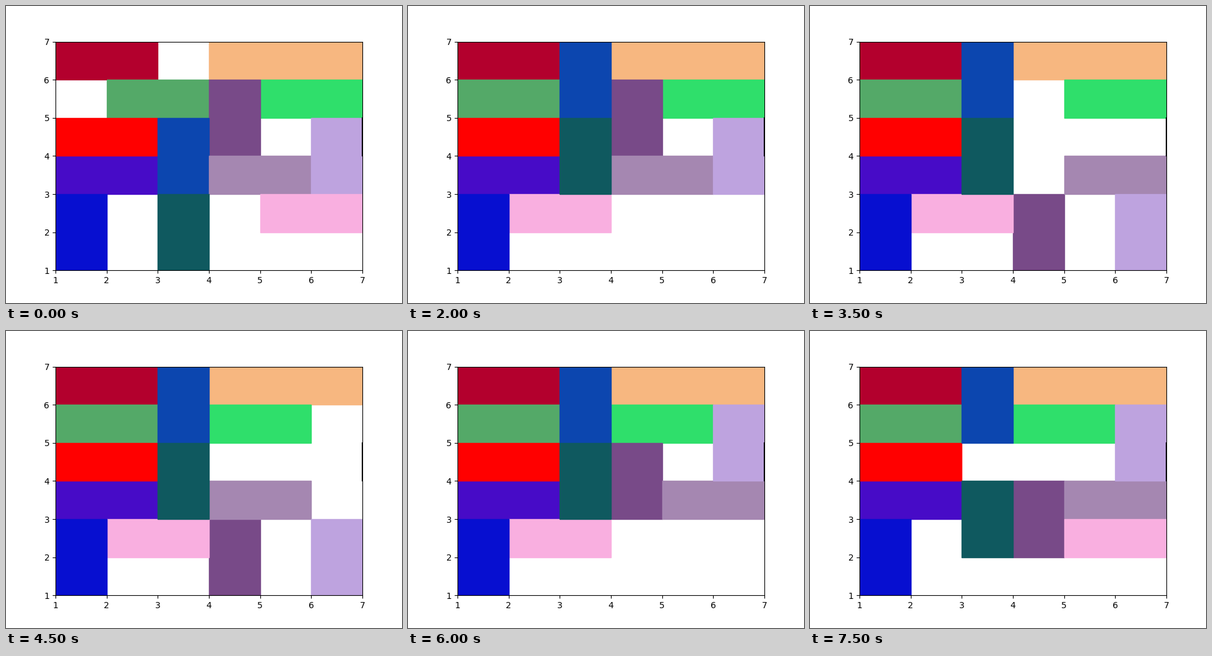
Recreate the animation shown at these times as a matplotlib script. Size 640x480 px, loop 8 s.

```python
import matplotlib.pyplot as plt
from matplotlib.animation import FuncAnimation
from matplotlib.patches import Rectangle

STEP_MS = 500

# name: (x, y, width, height, colour), listed from back to front
CARS = {
    "crimson": (1, 6, 2, 1, "#b3002d"),
    "orange": (4, 6, 3, 1, "#f7b780"),
    "green": (2, 5, 2, 1, "#54a968"),
    "lime": (5, 5, 2, 1, "#2fdf6b"),
    "purple": (4, 4, 1, 2, "#784a88"),
    "indigo": (1, 3, 2, 1, "#470bc7"),
    "red": (1, 4, 2, 1, "#ff0000"),
    "blue": (3, 3, 1, 2, "#0c46af"),
    "mauve": (4, 3, 2, 1, "#a587b1"),
    "lavender": (6, 3, 1, 2, "#bea3df"),
    "pink": (5, 2, 2, 1, "#f9afe0"),
    "navy": (1, 1, 1, 2, "#070fd0"),
    "teal": (3, 1, 1, 2, "#0f595f"),
}

# one slide per step: (car, dx, dy)
MOVES = [
    ("green", -1, 0),
    ("blue", 0, 2),
    ("teal", 0, 2),
    ("pink", -3, 0),
    ("lavender", 0, -2),
    ("mauve", 1, 0),
    ("purple", 0, -3),
    ("lime", -1, 0),
    ("mauve", -1, 0),
    ("lavender", 0, 3),
    ("mauve", 1, 0),
    ("purple", 0, 2),
    ("pink", 3, 0),
    ("purple", 0, -1),
    ("teal", 0, -1),
]

fig, ax = plt.subplots(figsize=(6.4, 4.8), dpi=100)
ax.set_xlim(1, 7)
ax.set_ylim(1, 7)

patches = {}
for name, (x, y, w, h, colour) in CARS.items():
    patches[name] = ax.add_patch(Rectangle((x, y), w, h, color=colour))

# exit on the right wall
ax.plot([7, 7], [4, 5], color="black", lw=1.5)


def update(step):
    pos = {name: car[:2] for name, car in CARS.items()}
    for name, dx, dy in MOVES[:step]:
        x, y = pos[name]
        pos[name] = (x + dx, y + dy)
    for name, patch in patches.items():
        patch.set_xy(pos[name])
    return list(patches.values())


anim = FuncAnimation(fig, update, frames=len(MOVES) + 1, interval=STEP_MS,
                     repeat=True, repeat_delay=0, blit=False)
plt.show()
```
